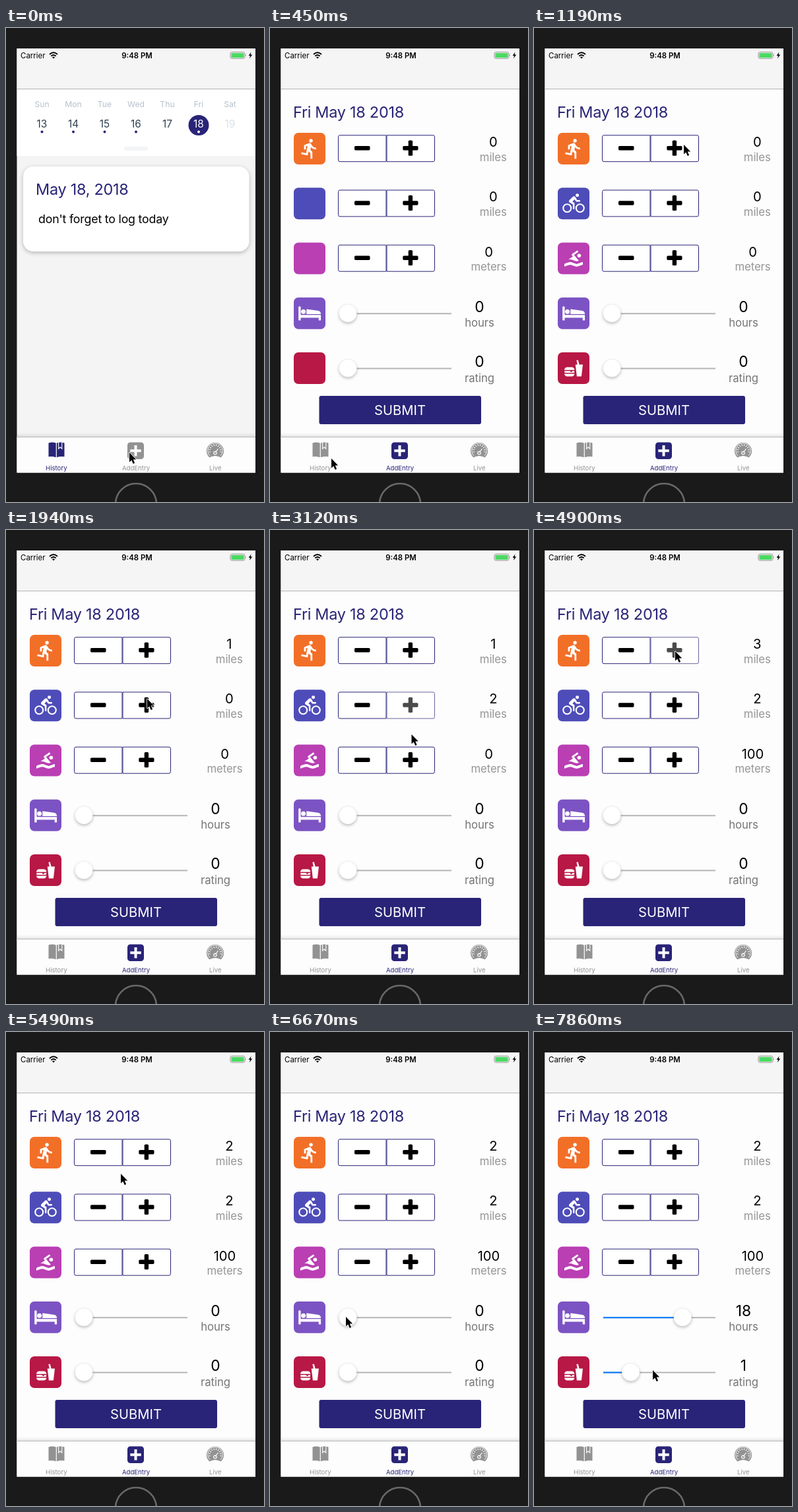
Animation, 391 px wide and 719 px high, one loop 8 s. Source, as an HTML page:

```html
<!DOCTYPE html>
<html lang="en">
<head>
<meta charset="utf-8">
<title>Fitness log</title>
<style>
  html, body { margin: 0; width: 100%; height: 100%; overflow: hidden; background: #1a1a1a; }
  svg { display: block; width: 391px; height: 719px; font-family: Inter, Roboto, "Liberation Sans", sans-serif; }
  text { white-space: pre; }
  .mid { text-anchor: middle; }
  .title { font-size: 23.5px; letter-spacing: -.3px; fill: #292477; }
  .unit { font-size: 16.8px; letter-spacing: -.1px; }
  .tab { color: #929292; fill: currentColor; }
  .tab.on { color: #292477; }
  .tab text { font-size: 9.6px; text-anchor: middle; }
  .hidden { visibility: hidden; }
  .thumb { filter: drop-shadow(0 2px 2px rgba(0, 0, 0, .25)); }
  .card { filter: drop-shadow(0 2px 3px rgba(0, 0, 0, .26)); }
</style>
</head>
<body>
<svg viewBox="0 0 391 719">
  <defs>
    <linearGradient id="shade" x2="0" y2="1">
      <stop offset="0" stop-opacity="0"/>
      <stop offset="1" stop-opacity=".09"/>
    </linearGradient>
  </defs>

  <rect width="391" height="719" fill="#1a1a1a"/>
  <circle cx="197" cy="722" r="31" fill="#1a1a1a" stroke="#686868" stroke-width="2.6"/>
  <rect x="16.5" y="31" width="361.5" height="643.5" fill="#f4f4f4"/>

  <g id="history">
    <rect x="16.5" y="93" width="361.5" height="101" fill="#fff"/>
    <g id="week"></g>
    <rect x="179" y="180" width="36" height="6" rx="2" fill="#f2f4f5"/>
    <rect class="card" x="26" y="210" width="342.5" height="129" rx="15.5" fill="#fff"/>
    <text class="title" x="45" y="252.5">May 18, 2018</text>
    <text x="49" y="296" font-size="17.8" letter-spacing="-.2">don't forget to log today</text>
  </g>

  <g id="entry">
    <rect x="16.5" y="93" width="361.5" height="530" fill="#fdfdfd"/>
    <text class="title" x="35" y="136">Fri May 18 2018</text>
    <g id="rows"></g>
    <rect x="74.5" y="558" width="245.5" height="43" rx="3" fill="#292477"/>
    <text class="mid" x="197" y="587.3" font-size="20.2" fill="#fff">SUBMIT</text>
  </g>

  <!-- status bar and header -->
  <rect x="16.5" y="31" width="361.5" height="61.5" fill="#f5f5f5"/>
  <rect x="16.5" y="92" width="361.5" height="1" fill="#b5b5b5"/>
  <text x="22" y="45.5" font-size="11.5">Carrier</text>
  <g fill="none" stroke="#000" stroke-width="1.9">
    <path d="M66 40Q72 34.6 78 40M68.3 42.6Q72 39.4 75.7 42.6"/>
    <path d="M72 46.4L70 44.4Q72 42.6 74 44.4Z" fill="#000" stroke="none"/>
  </g>
  <text class="mid" x="198.5" y="45.5" font-size="11.4" font-weight="600">9:48 PM</text>
  <rect x="340" y="36.5" width="22" height="9.8" rx="2.4" fill="none" stroke="#8a8a8a" stroke-width=".9"/>
  <rect x="341.4" y="37.9" width="19.2" height="7" rx="1.2" fill="#4cd964"/>
  <path d="M363.2 39.7q1.8 1.7 0 3.4z" fill="#8a8a8a"/>
  <path d="M371.6 36.6L367.6 42H370L369 46.2L373.2 40.6H370.7Z"/>

  <!-- tab bar -->
  <rect x="16.5" y="614" width="361.5" height="6" fill="url(#shade)"/>
  <rect x="16.5" y="620" width="361.5" height="54.5" fill="#fdfdfd"/>
  <rect x="16.5" y="620" width="361.5" height="1" fill="#b9b9b9"/>
  <g class="tab" id="tabHistory">
    <path d="M64.5 629.5Q70 627.4 75.7 629.5V651.3Q70 649.2 64.5 650.3ZM76.9 629.5Q82 627.4 88.5 629.5V650.3Q82 649.2 76.9 651.3Z"/>
    <path d="M79.6 628.2V638.2L82.2 635.8L84.8 638.2V628.4" fill="none" stroke="#fdfdfd" stroke-width="1.1"/>
    <text x="76.3" y="671">History</text>
  </g>
  <g class="tab" id="tabEntry">
    <rect x="184" y="628.5" width="25" height="25.5" rx="4.5"/>
    <path d="M196.5 633V649.5M188.3 641.2H204.7" stroke="#fdfdfd" stroke-width="4"/>
    <text x="197" y="671">AddEntry</text>
  </g>
  <g class="tab">
    <path d="M308.3 651.5A13 13 0 1 1 325.7 651.5Q317 646.5 308.3 651.5Z"/>
    <g fill="none" stroke="#fdfdfd">
      <path d="M308.9 648.9A11.3 11.3 0 1 1 325.1 648.9" stroke-width=".9"/>
      <path d="M308.8 643.5A8.5 8.5 0 1 1 325.2 643.5" stroke-width="2.4" stroke-dasharray="1.1 2.2"/>
      <path d="M317 644L321.5 638.3" stroke-width="1.2"/>
      <circle cx="317" cy="644.5" r="2.3" stroke-width="1.1"/>
    </g>
    <text x="317.3" y="671">Live</text>
  </g>

  <path id="cursor" d="M0 0V14.6L3.3 11.5L5.7 17L8.1 16L5.8 10.6H10.2Z"
        stroke="#fff" stroke-width="1.5" stroke-linejoin="round" paint-order="stroke"/>
</svg>

<script>
const LOOP = 8000, TICK = 148, LAST = 53;
const $ = id => document.getElementById(id);

const GLYPHS = {
  run: '<path d="M13.49 5.48c1.1 0 2-.9 2-2s-.9-2-2-2-2 .9-2 2 .9 2 2 2zm-3.6 13.9l1-4.4 2.1 2v6h2v-7.5l-2.1-2 .6-3c1.3 1.5 3.3 2.5 5.5 2.5v-2c-1.9 0-3.5-1-4.3-2.4l-1-1.6c-.4-.6-1-1-1.7-1-.3 0-.5.1-.8.1l-5.2 2.2v4.7h2v-3.4l1.8-.7-1.6 8.1-4.9-1-.4 2 7 1.4z"/>',
  bike: '<g fill="none" stroke="#fff" stroke-width="1.5"><circle cx="5" cy="17" r="4.25"/><circle cx="19" cy="17" r="4.25"/></g><circle cx="16" cy="3" r="1.8"/><path d="M14.8 10H19V8.2H15.8L13.86 4.93C13.57 4.43 13 4.1 12.4 4.1C11.93 4.1 11.5 4.29 11.2 4.6L7.5 8.29C7.19 8.6 7 9 7 9.5C7 10.13 7.33 10.66 7.85 10.97L11.2 13V18H13V11.5L10.75 9.85L13.07 7.5Z"/>',
  swim: '<circle cx="18" cy="9" r="2"/><path d="M2 18C4.22 17 6.44 16 8.67 16C10.89 16 13.11 18 15.33 18C17.56 18 19.78 16 22 16V19C19.78 19 17.56 21 15.33 21C13.11 21 10.89 19 8.67 19C6.44 19 4.22 20 2 21ZM8.67 13C7.89 13 7.12 13.12 6.35 13.32L11.27 9.88L10.23 8.64C10.09 8.47 10 8.24 10 8C10 7.66 10.17 7.35 10.44 7.17L16.16 3.17L17.31 4.8L12.47 8.19L17.7 14.42C16.91 14.75 16.12 15 15.33 15C13.11 15 10.89 13 8.67 13Z"/>',
  sleep: '<path d="M0 5.4Q0 4.5 1.2 4.5T2.4 5.4V13.8H24.2V19.6H21.8V16.8H2.4V19.6H0ZM8.6 8.2Q8.6 7.6 9.2 7.6L20.6 9.2Q24.2 9.6 24.2 12.9H8.6Z"/><circle cx="5.3" cy="10.2" r="2.5"/>',
  eat: '<path d="M15.5 21L14 8H16.23L15.1 3.46L16.84 3L18.09 8H22L20.5 21ZM5 11H10A3 3 0 0 1 13 14H2A3 3 0 0 1 5 11M13 18A3 3 0 0 1 10 21H5A3 3 0 0 1 2 18ZM3 15H8L9.5 16.5L11 15H12A1 1 0 0 1 12 17H3A1 1 0 0 1 3 15Z"/>'
};

// late: the glyph shows up a moment after the screen; log: [tick, value]
const ROWS = [
  { id: 'run', color: '#f26f28', unit: 'miles', x: 338.3, log: [[0, 0], [11, 1], [31, 2], [32, 3], [35, 2]] },
  { id: 'bike', color: '#4e4cb8', unit: 'miles', x: 338.3, late: true, log: [[0, 0], [18, 1], [20, 2]] },
  { id: 'swim', color: '#b93fb3', unit: 'meters', x: 331.5, late: true, log: [[0, 0], [23, 100]] },
  { id: 'sleep', color: '#7c53c3', unit: 'hours', x: 317.5, max: 24, log: [[0, 0], [46, 5], [47, 13], [48, 18]] },
  { id: 'eat', color: '#b71845', unit: 'rating', x: 317.5, max: 5, late: true, log: [[0, 0], [52, 1]] }
];

const PRESSES = [[11, 'run+'], [18, 'bike+'], [20, 'bike+'], [23, 'swim+'], [31, 'run+'], [32, 'run+'], [35, 'run-']];
const BUTTONS = ['run', 'bike', 'swim'].flatMap(id => [id + '-', id + '+']);

// [tick, x, y] of the pointer tip
const PATH = [
  [0, 187, 644], [1, 180, 649], [3, 93, 653], [5, 105, 480], [7, 205, 225], [8, 227, 177],
  [9, 229, 183], [11, 229, 183], [13, 214, 256], [15, 214, 271], [18, 214, 271], [20, 216, 270],
  [22, 213, 350], [23, 213, 354], [24, 214, 321], [25, 214, 321], [28, 169, 178], [29, 155, 176],
  [31, 212, 182], [33, 214, 184], [35, 143, 183], [36, 150, 190], [37, 174, 215], [40, 122, 437],
  [41, 125, 438], [45, 115, 432], [46, 145, 433], [47, 193, 434], [48, 223, 436], [49, 205, 480],
  [50, 140, 506], [51, 117, 514], [52, 148, 514], [53, 180, 513]
];

const thumbX = (row, value) => 118 + 143 * value / row.max;

function stepper({ id }, y) {
  return `<rect x="103.5" y="${y + 3.7}" width="146" height="40" rx="2.5" fill="#fff"/>
    <g id="${id}-"><path d="M176 ${y + 3.7}H106q-2.5 0-2.5 2.5v35q0 2.5 2.5 2.5H176Z" fill="#fff" stroke="#292477"/>
      <rect x="128" y="${y + 20}" width="23.5" height="6.4" rx="1.6"/></g>
    <g id="${id}+"><path d="M177 ${y + 3.7}H247q2.5 0 2.5 2.5v35q0 2.5-2.5 2.5H177Z" fill="#fff" stroke="#292477"/>
      <rect x="201.3" y="${y + 20}" width="23.2" height="6.4" rx="1.6"/>
      <rect x="209.7" y="${y + 11.6}" width="6.4" height="23.2" rx="1.6"/></g>`;
}

function slider({ id }, y) {
  return `<path d="M105 ${y + 24.5}H275" stroke="#b5b5b5" stroke-width="2"/>
    <rect id="${id}Fill" x="105" y="${y + 23.5}" height="2" fill="#007aff"/>
    <circle id="${id}Thumb" class="thumb" cy="${y + 24}" r="13.5" fill="#fff" stroke="#000" stroke-opacity=".08" stroke-width=".5"/>`;
}

$('rows').innerHTML = ROWS.map((row, i) => {
  const y = 159 + i * 83.25, big = row.max;
  return `<rect x="36" y="${y}" width="48" height="48" rx="7" fill="${row.color}"/>
    <g id="${row.id}Glyph" fill="#fff" transform="translate(43.2 ${y + 7.2}) scale(1.4)">${GLYPHS[row.id]}</g>
    ${big ? slider(row, y) : stepper(row, y)}
    <text id="${row.id}Value" class="mid" x="${row.x}" y="${y + (big ? 22.3 : 21)}" font-size="${big ? 22.8 : 20.2}"></text>
    <text class="mid unit" x="${row.x}" y="${y + (big ? 44.5 : 42.7)}" fill="${big ? '#757575' : '#969696'}">${row.unit}</text>`;
}).join('');

$('week').innerHTML = ['Sun', 'Mon', 'Tue', 'Wed', 'Thu', 'Fri', 'Sat'].map((name, i) => {
  const x = 54.5 + i * 47.5, today = i === 5;
  const ink = today ? '#fff' : i === 6 ? '#d9e1e8' : '#2d4150';
  return `<text class="mid" x="${x}" y="119.8" font-size="12.2" fill="#b6c1cd">${name}</text>
    ${today ? `<circle cx="${x}" cy="147.5" r="15.5" fill="#292477"/>` : ''}
    <text class="mid" x="${x}" y="151" font-size="15.4" fill="${ink}">${13 + i}</text>
    ${i < 4 || today ? `<circle cx="${x}" cy="157.5" r="2" fill="${today ? '#fff' : '#292477'}"/>` : ''}`;
}).join('');

const valueAt = (log, tick) => log.filter(([from]) => from <= tick).pop()[1];

function pointerAt(tick) {
  const next = PATH.findIndex(([at]) => at >= tick);
  const [tb, xb, yb] = PATH[next];
  const [ta, xa, ya] = PATH[Math.max(0, next - 1)];
  const k = tb === ta ? 0 : (tick - ta) / (tb - ta);
  return [xa + (xb - xa) * k, ya + (yb - ya) * k];
}

// A pressed button dims, then fades back over the next tick.
function opacityAt(id, tick) {
  const ages = PRESSES.filter(p => p[1] === id && p[0] <= tick).map(p => tick - p[0]);
  return [.2, .7][Math.min(...ages)] ?? 1;
}

function render(time) {
  const tick = Math.min(LAST, Math.floor(time / TICK));
  const entry = tick >= 2;
  $('history').classList.toggle('hidden', entry);
  $('entry').classList.toggle('hidden', !entry);
  $('tabHistory').classList.toggle('on', !entry);
  $('tabEntry').classList.toggle('on', entry);

  for (const row of ROWS) {
    const value = valueAt(row.log, tick);
    $(row.id + 'Value').textContent = value;
    $(row.id + 'Glyph').classList.toggle('hidden', !!row.late && tick < 4);
    if (row.max) {
      const x = thumbX(row, value);
      $(row.id + 'Thumb').setAttribute('cx', x);
      $(row.id + 'Fill').setAttribute('width', value ? x - 105 : 0);
    }
  }
  for (const id of BUTTONS) $(id).setAttribute('opacity', opacityAt(id, tick));
  $('cursor').setAttribute('transform', `translate(${pointerAt(tick)})`);
}

const start = performance.now();
function loop() {
  render((performance.now() - start) % LOOP);
  requestAnimationFrame(loop);
}
loop();
</script>
</body>
</html>
```
